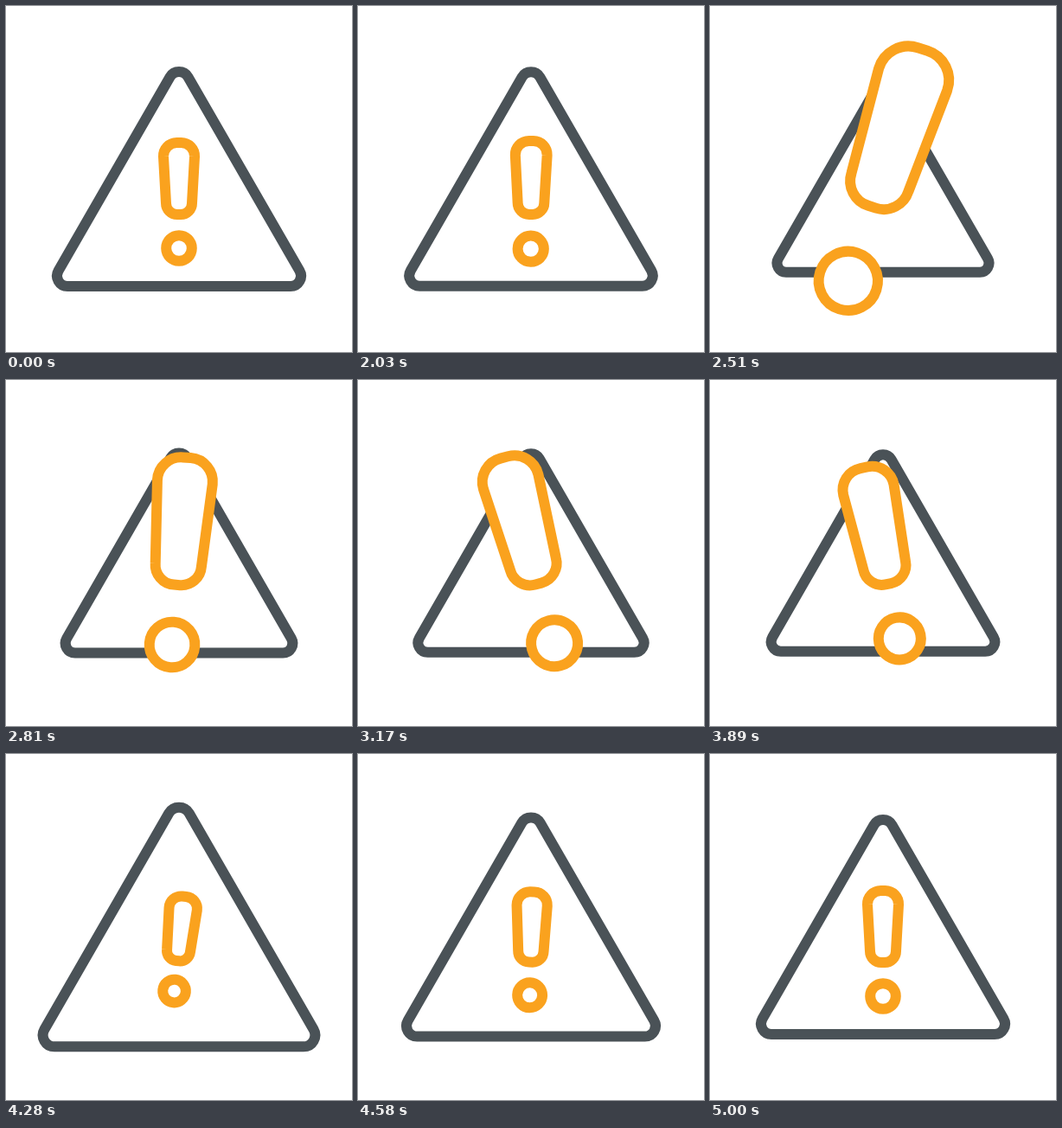
Recreate the animation shown at these times as an HTML page. Size 400 px wide and 400 px high, loop 5.03 s.

```html
<!DOCTYPE html>
<html lang="en">
<head>
<meta charset="utf-8">
<title>Warning sign</title>
<style>
  html, body { margin: 0; height: 100%; overflow: hidden; background: #fff; }
  svg { display: block; width: 100%; height: 100%; }
  path, circle { fill: #fff; stroke-width: 12; vector-effect: non-scaling-stroke; }
  #sign { stroke: #4a5257; }
  #mark { stroke: #faa21e; }
</style>
</head>
<body>
<svg viewBox="0 0 400 400">
  <path id="sign" d="M-129 124H129A12 12 0 0 0 139.4 106L10.4 -118A12 12 0 0 0 -10.4 -118L-139.4 106A12 12 0 0 0 -129 124Z"/>
  <g id="mark">
    <path d="M-2.5 -65H2.5A15.5 15.5 0 0 1 18 -49L15 5A13 13 0 0 1 2 18H-2A13 13 0 0 1 -15 5L-18 -49A15.5 15.5 0 0 1 -2.5 -65Z"/>
    <circle cy="57" r="14.8"/>
  </g>
</svg>
<script>
const LOOP = 5030, REST = 2000, STEP = 30;
const sign = document.getElementById('sign');
const mark = document.getElementById('mark');

function draw(now) {
  const time = now % LOOP;
  const t = time < REST + STEP ? 0 : Math.floor((time - REST) / STEP) * STEP;

  // Eased 0 to 1 between two times, and a rise followed by a fall.
  const ramp = (from, to) => {
    const p = Math.min(1, Math.max(0, (t - from) / (to - from)));
    return p * p * (3 - 2 * p);
  };
  const hump = (from, top, to) => ramp(from, top) - ramp(top, to);

  // The mark swells twice while the sign shrinks; both overshoot on the way back.
  const swell = ramp(0, 400) - ramp(1620, 2170) - .53 * hump(400, 960, 1620);
  const shrink = ramp(0, 400) - ramp(1770, 2175) - .62 * hump(400, 960, 1620);
  const markScale = 1 + 1.38 * swell - .11 * hump(1620, 2170, 2740);
  const signScale = 1 - .14 * shrink + .128 * hump(1770, 2175, 2720);
  const tilt = ramp(0, 420) - 2 * ramp(420, 1350) + ramp(1720, 2210);
  const turn = 18.8 * tilt + 6.4 * hump(1720, 2210, 2740);
  const markY = 223 - 32 * swell;

  sign.setAttribute('transform', `translate(200 200) scale(${signScale})`);
  mark.setAttribute('transform', `translate(200 ${markY}) rotate(${turn}) scale(${markScale})`);
}

const start = performance.now();
function tick() {
  draw(performance.now() - start);
  requestAnimationFrame(tick);
}
tick();
</script>
</body>
</html>
```
